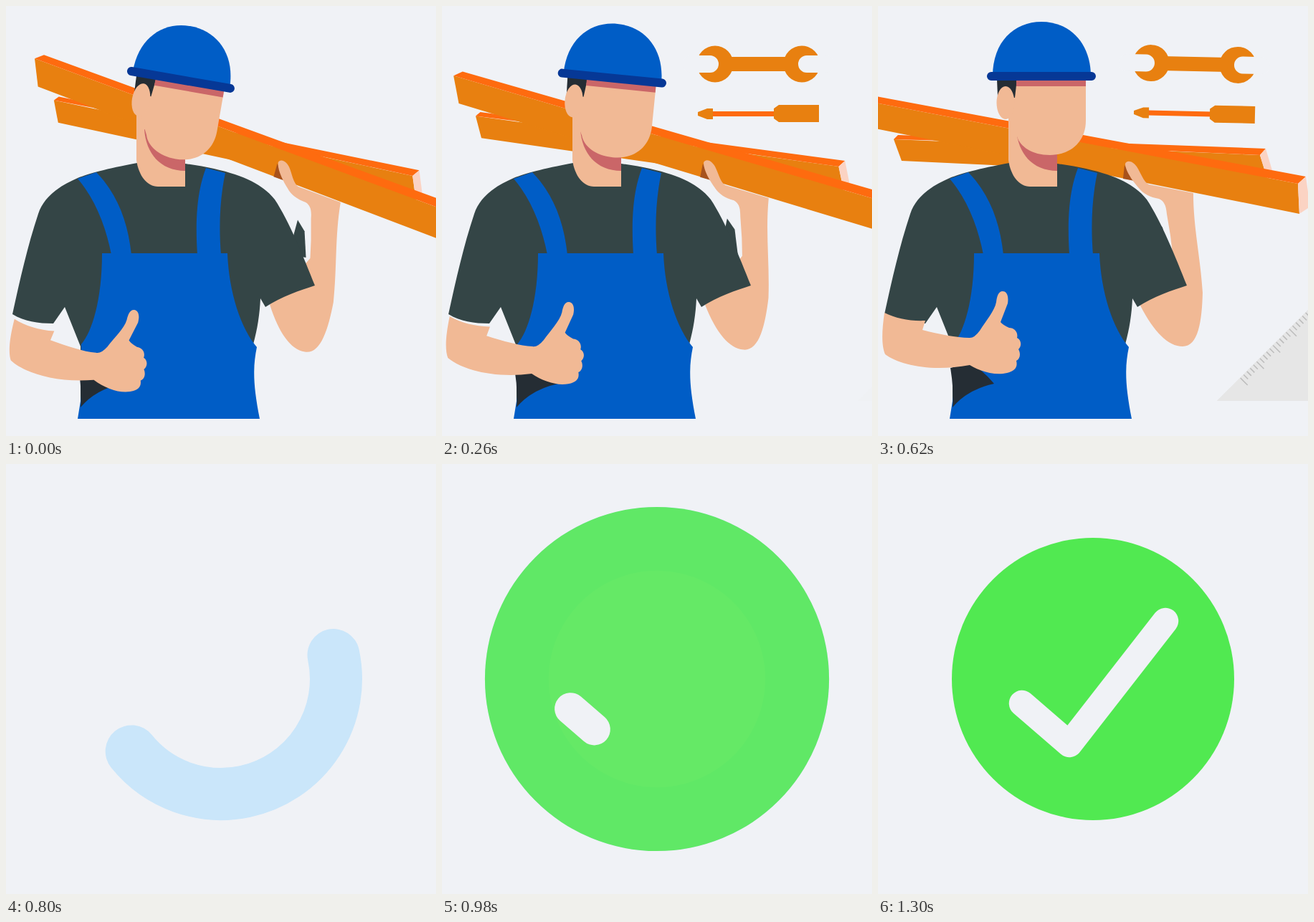
Animation of 600 by 600 pixels, one loop 1.34 s. Source, as an HTML page:

```html
<!DOCTYPE html>
<html lang="en">
<head>
<meta charset="utf-8">
<title>Builder and check mark</title>
<style>
  html, body { margin: 0; height: 100%; overflow: hidden; background: #f0f2f6; }
  svg { display: block; width: 100vw; height: 100vh; }
  .skin { fill: #f1b995; }
  .blue { fill: #005dc6; }
  .shirt { fill: #344546; }
  .dark { fill: #252d34; }
  .blush { fill: #ca6668; }
  .wood { fill: #e88010; }
  .top { fill: #fe6b0f; }
  .end { fill: #fbd3c3; }
  .line { fill: none; stroke-linecap: round; stroke-linejoin: round; }
</style>
</head>
<body>
<svg viewBox="0 0 600 600">
  <g id="worker">
    <g id="ruler">
      <path fill="#e6e6e6" d="M473 551L800 224V551Z"/>
      <path id="ticks" stroke="#bdbdbd" stroke-width="1.6"/>
    </g>
    <g id="wrench">
      <g class="wood">
        <circle cx="381" cy="81" r="25.5"/>
        <circle cx="502" cy="81" r="25.5"/>
        <path d="M395 71H488V91H395Z"/>
      </g>
      <path class="line" stroke="#f0f2f6" stroke-width="24" d="M348 81H374M535 81H509"/>
    </g>
    <g id="driver">
      <path class="top" d="M376 147H466V154H376Z"/>
      <path class="wood" d="M357 148L370 143H378V158H370L357 153ZM470 138H526V162H470L463 157V143Z"/>
    </g>

    <g id="load">
      <path class="wood" d="M22 186L533 208L543 240L33 216Z"/>
      <path class="top" d="M22 186L28 180L541 199L533 208L95 188Z"/>
      <path class="end" d="M533 208L541 199L550 229L541 234Z"/>
      <path class="wood" d="M-14 133L586 248L588 290L-3 171Z"/>
      <path class="top" d="M-14 133L-2 126L597 238L586 248Z"/>
      <path class="end" d="M586 248L597 238L603 280L588 290Z"/>
      <path fill="#a8521c" d="M344 222L342 241L358 244Z"/>
      <path class="skin" d="M345 220C348 214 356 217 361 224C367 233 370 245 378 249L440 261C440 310 450 350 453 400C452 440 447 475 425 475C405 475 385 455 366 418L411 345L408 320L403 290C402 278 399 272 392 269C380 267 370 262 364 254C356 245 345 230 345 220Z"/>
      <path class="shirt" d="M385 295L397 309L405 345L380 345Z"/>
    </g>

    <path class="shirt" d="M183 219C140 227 115 234 100 240C72 252 52 268 45 290C30 335 20 380 9 430C25 440 45 443 66 443L82 420L104 475V560H300L345 472C351 450 354 430 355 408L362 420C385 405 410 397 431 390C415 350 395 300 375 270C355 245 320 230 250 220Z"/>
    <path class="skin" d="M182 110V215C185 237 197 252 212 252H250V120Z"/>
    <path class="blush" d="M193 172C195 205 215 230 250 230V190Z"/>
    <g id="head">
      <path class="skin" d="M183 106H290V160C290 190 268 208 240 208C215 208 198 196 194 182L183 160Z"/>
      <path class="dark" d="M166 102H194L191 128L167 126Z"/>
      <ellipse class="skin" cx="178" cy="135" rx="12.5" ry="23"/>
      <path class="blush" d="M193 102H290V112H193Z"/>
      <path class="blue" d="M160 98C160 50 190 22 228 22C268 22 297 52 297 98Z"/>
      <path class="line" stroke="#063896" stroke-width="12" d="M158 98H298"/>
    </g>

    <path class="blue" d="M100 241L126 232C155 262 170 300 175 347H147C140 310 125 270 100 241ZM279 226L306 233C298 270 297 310 300 347H267C264 300 266 260 279 226Z"/>
    <path class="blue" d="M134 345H309C311 400 328 450 350 476C344 505 345 530 354 576H100L105 545V472C120 455 134 410 134 345Z"/>
    <path class="dark" d="M101 505L130 498Q150 512 162 527Q125 535 104 560Q106 535 101 505Z"/>
    <path id="thumb" class="skin" d="M9 428C5 455 5 475 10 486C30 501 75 511 128 501C145 511 165 516 180 512C192 509 195 503 193 495C199 492 199 484 196 479C201 474 200 466 194 463C196 455 190 449 183 449Q174 445 171 441L181 415C183 402 178 398 174 398C168 398 166 405 165 413C163 425 150 440 142 453Q134 464 127 463C110 463 85 458 62 452L66 439C45 440 25 436 9 428Z"/>
  </g>

  <g id="badge">
    <circle id="ring" class="line" r="160.5" stroke="#cae6fa" stroke-width="73" pathLength="360"/>
    <circle id="disc" r="197" fill="#51e951"/>
    <path id="check" class="line" stroke="#f0f2f6" stroke-width="36.5" pathLength="1" d="M-99 34L-33 91L101 -81"/>
  </g>
</svg>
<script>
const LOOP = 1340, SWITCH = 660;
const part = Object.fromEntries([...document.querySelectorAll('[id]')].map(e => [e.id, e]));
const set = (id, name, value) => part[id].setAttribute(name, value);
const show = (id, on) => { part[id].style.display = on ? '' : 'none'; };
const ramp = (t, from, to) => Math.min(1, Math.max(0, (t - from) / (to - from)));
const ease = (t, from, to) => { const p = ramp(t, from, to); return p * p * (3 - 2 * p); };

let ticks = '';
for (let i = 0; i < 40; i++) {
  const x = 506 + 4.55 * i, size = i % 5 ? 6 : 10;
  ticks += `M${x} ${1025 - x}l${size} ${size}`;
}
set('ticks', 'd', ticks);

function popTool(id, y, t, start) {
  const scale = ease(t, start, start + 140);
  const tilt = 1.3 * Math.max(0, t - 260) / 360;
  show(id, scale > 0);
  set(id, 'transform', `translate(441.5 ${y}) rotate(${tilt}) scale(${scale}) translate(-441.5 ${-y})`);
}

function drawWorker(t) {
  const lean = 1 - t / 620;
  set('head', 'transform', `rotate(${9.86 * lean} 207 193)`);
  set('load', 'transform', `rotate(${9.46 * lean} 375 430)`);
  set('thumb', 'transform', `rotate(${6 * lean} -73 459)`);
  popTool('wrench', 81, t, 40);
  popTool('driver', 150, t, 100);
  set('ruler', 'transform', `translate(${107 * (620 - t) / 360} 0)`);
  set('ruler', 'opacity', ramp(t, 240, 380));
}

function drawBadge(t) {
  const scale = 1 + 0.31 * (ease(t, 840, 1060) - ease(t, 1080, 1300));
  const arc = 360 * ease(t, 720, 900);
  const stroke = ease(t, 960, 1058);
  set('badge', 'transform', `translate(300 300) scale(${scale})`);
  show('ring', arc > 0 && t < 1000);
  set('ring', 'stroke-dasharray', arc < 360 ? `${arc} 720` : 'none');
  set('ring', 'transform', `rotate(${0.96 * (t - 800) - 13})`);
  set('disc', 'opacity', ease(t, 915, 1000));
  show('check', stroke > 0);
  set('check', 'stroke-dasharray', `${stroke} 2`);
}

function frame() {
  const t = performance.now() % LOOP, working = t < SWITCH;
  show('worker', working);
  show('badge', !working);
  (working ? drawWorker : drawBadge)(t);
  requestAnimationFrame(frame);
}
frame();
</script>
</body>
</html>
```
